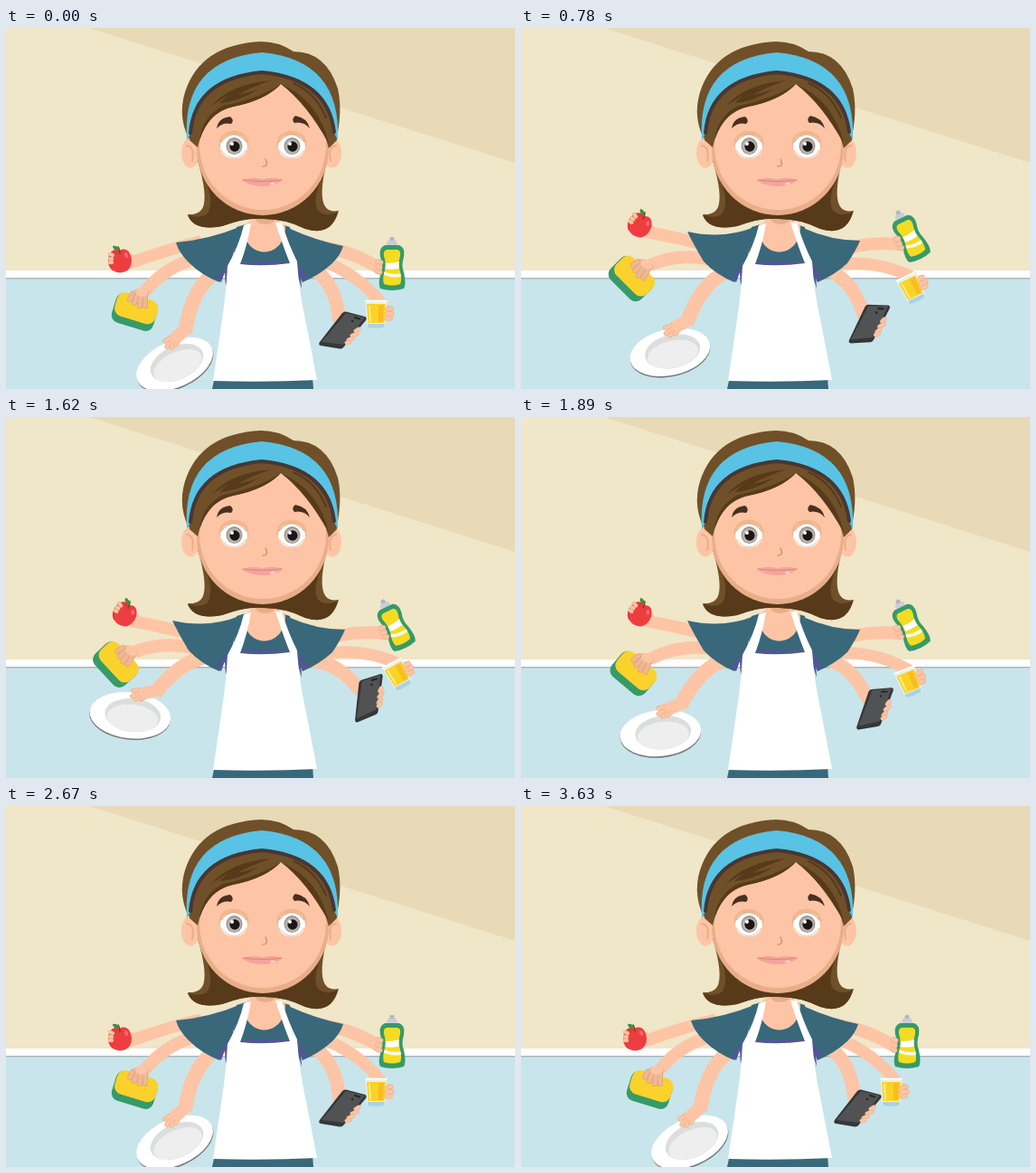
An HTML page with a canvas that plays this animation: 563 by 399 pixels, repeating every 3660 ms.

```html
<!DOCTYPE html>
<html lang="en">
<head>
<meta charset="utf-8">
<title>Busy hands</title>
<style>
html, body { margin: 0; width: 100%; height: 100%; overflow: hidden; background: #f0e6c7; }
canvas { display: block; }
</style>
</head>
<body>
<canvas id="stage" width="563" height="399"></canvas>
<script>
const ctx = document.getElementById('stage').getContext('2d');
const LOOP = 3660;
const SKIN = '#fdc5a5', SKIN_DARK = '#e9ae89', TEAL = '#38687a', PURPLE = '#515793';
const HAIR = '#6f5029', HAIR_DARK = '#573a1a', GREEN = '#369a69', YELLOW = '#fbd22c';

const fill = (d, color) => { ctx.fillStyle = color; ctx.fill(new Path2D(d)); };
function line(d, color, width, cap = 'round') {
  ctx.strokeStyle = color;
  ctx.lineWidth = width;
  ctx.lineCap = cap;
  ctx.lineJoin = 'round';
  ctx.stroke(new Path2D(d));
}
function oval(x, y, rx, ry, color, deg = 0) {
  ctx.fillStyle = color;
  ctx.beginPath();
  ctx.ellipse(x, y, rx, ry, deg * Math.PI / 180, 0, 7);
  ctx.fill();
}
function box(x, y, w, h, r, color) {
  ctx.fillStyle = color;
  ctx.beginPath();
  ctx.roundRect(x, y, w, h, r);
  ctx.fill();
}
function turned(x, y, deg, draw) {
  ctx.save();
  ctx.translate(x, y);
  ctx.rotate(deg * Math.PI / 180);
  ctx.translate(-x, -y);
  draw();
  ctx.restore();
}
function fingers(width, ...paths) {
  for (const d of paths) {
    line(d, SKIN_DARK, width);
    line(d, SKIN, width - 1.2);
  }
}

const ease = (t, from, to) => {
  const u = Math.min(1, Math.max(0, (t - from) / (to - from)));
  return u * u * (3 - 2 * u);
};
// Raised amount: rises during [a, b], falls during [c, d].
const lift = (t, a, b, c, d) => ease(t, a, b) - ease(t, c, d);

function background() {
  ctx.fillStyle = '#f0e6c8';
  ctx.fillRect(0, 0, 563, 399);
  fill('M92 0H563V149Z', '#e8dab7');
  ctx.fillStyle = '#fff';
  ctx.fillRect(0, 268, 563, 8);
  ctx.fillStyle = '#a9b6bd';
  ctx.fillRect(0, 276, 563, 1.7);
  ctx.fillStyle = '#c8e5eb';
  ctx.fillRect(0, 277.7, 563, 122);
}

function plateArm() {
  oval(187, 373, 45, 25.5, '#77797b', -24);
  oval(186.5, 371.5, 45, 25.5, '#fff', -24);
  oval(189, 370, 31, 18.5, '#dcdddd', -24);
  oval(190, 373, 28.5, 15, '#eeeeee', -24);
  line('M238 266Q205 284 198 337', SKIN, 16, 'butt');
  fill('M190 331L205 335Q197 346 188 349L179 341Z', SKIN);
  fingers(5.4, 'M186 340L176 346', 'M188 342L178 352', 'M190 343L183 353', 'M192 343L188 350');
  oval(189, 341, 7, 6, SKIN);
}

function spongeArm() {
  line('M220 252Q178 261 154 291', SKIN, 14, 'butt');
  turned(143, 312, 17, () => {
    box(119, 297, 48, 34, 9, GREEN);
    box(120, 296, 47, 27, 9, YELLOW);
  });
  oval(147, 295, 12, 7, '#f0b893', -20);
  for (const d of ['M140 294L137 300', 'M145 296L142 304', 'M149 297L148 307', 'M154 297L154 307']) {
    line(d, '#d99f78', 6);
    line(d, '#f0b893', 4.8);
  }
  oval(150, 292, 7, 5, SKIN);
}

function appleArm() {
  line('M216 236Q188 242 139 259', SKIN, 13.5, 'butt');
  oval(138, 258, 7, 8, SKIN);
  oval(121.5, 257, 8.5, 12, '#ea353a');
  oval(130, 257, 9, 12.5, '#ee3d40');
  oval(126, 260, 10, 10.5, '#ee3d40');
  line('M126 249Q126 245 124 242', '#70451f', 1.5);
  fill('M125 246Q118 246 118 241Q124 240 125 246Z', '#3b9242');
  oval(133, 251, 2, 3, '#f4686a', -25);
  fingers(4.4, 'M115 250L118 251', 'M115 255L117 255', 'M115 259L117 259');
}

function bottleArm() {
  line('M344 242Q378 244 414 266', SKIN, 14, 'butt');
  oval(413, 264, 6, 9, SKIN);
  box(424.5, 231, 5, 7, 1.5, '#aeb7c5');
  box(421.5, 235, 11, 6, 2, '#c7ced9');
  fill('M419 240H435Q442 243 440 253Q437 262 440 270Q443 283 440 288Q427 292 414 288Q411 282 415 270Q418 262 414 253Q412 243 419 240Z', GREEN);
  const label = new Path2D('M421 245H433Q437 246 436 252Q433 262 436 269Q438 279 436 283Q427 286 418 283Q416 277 419 268Q421 261 418 252Q417 246 421 245Z');
  ctx.save();
  ctx.clip(label);
  box(414, 242, 28, 46, 0, '#f3dc22');
  fill('M414 259Q426 262 441 256V264Q428 269 414 265Z', '#fff');
  fill('M414 267Q427 275 441 270V274Q427 278 414 271Z', '#fffbe8');
  ctx.restore();
  fingers(5, 'M411 258L415 259', 'M411 264L414 265', 'M411 269L414 270');
}

function glassArm() {
  line('M346 256Q390 271 417 307', SKIN, 13, 'butt');
  oval(423, 315, 6, 8.5, SKIN, -10);
  fill('M397.5 301H421.5L419.5 331Q409 333 399.5 331Z', '#e8f1ee');
  fill('M399 305H420L418.5 326H400.5Z', '#fbd326');
  fill('M412 306H418L417 325H412Z', '#f8bd20');
  line('M402 307L403 324', '#fff0a0', 1.5);
  fill('M400 327H419L418.5 331Q409 333 400 331Z', '#a9d3e4');
  line('M398 301.5H421', '#fff', 1.5);
  fingers(5, 'M422 311L426 310', 'M421 316L427 316', 'M421 321L425 321');
}

function phoneArm() {
  line('M336 264Q365 279 369 325', SKIN, 15, 'butt');
  oval(380, 337, 7, 9, SKIN, 25);
  fill('M376 313.5L397 319Q400 320 398 323L374 352Q372 355 369 354.5L348 351Q345 350 347 347L372 315Q374 313 376 313.5Z', '#353638');
  fill('M376 315L397 320L373 350L349 347Z', '#515254');
  line('M386 320L391 321.5', '#252628', 2.2);
  oval(383, 324, 1.3, 1.3, '#252628');
  fingers(5, 'M390 333L387 335', 'M388 338L383 340', 'M383 343L379 345', 'M380 347L377 348');
}

function torso(up) {
  fill('M255 220Q285 210 314 220L322 300H246Z', TEAL);
  fill('M231 385H339L340 399H228Z', TEAL);
  const ly = 237 - 12 * up, ry = 241 - 6 * up;
  fill(`M258 220Q224 234 ${188 - 4 * up} ${ly}Q${191 - 2 * up} ${ly + 11} 202 ${259 - up}Q216 273 236 281L250 255Z`, TEAL);
  fill(`M312 221Q343 235 ${373 + 2 * up} ${ry}Q${370 + up} ${ry + 10} 361 260Q347 273 328 281L317 255Z`, TEAL);
  fill('M247 258L232 277L238 281L242 270L243 285L249 262Z', PURPLE);
  fill('M321 258L334 275L328 281L326 272L327 288L319 262Z', PURPLE);
  fill('M263 219C262 257 309 257 309 219L297 210H274Z', SKIN);
  fill('M275 209H299Q297 217 286 217Q276 216 275 209Z', SKIN_DARK);
  fill('M253 258H319V263H253Z', PURPLE);
  fill('M263 218L271 216Q267 240 259 261Q285 264 314 260Q306 240 298 215L305 215Q312 238 322 258Q324 290 331 322Q337 352 344 389Q286 392 229 390Q235 350 241 308Q244 285 245 263Q258 240 263 218Z', '#fff');
}

function eye(x) {
  oval(x, 127.5, 16.5, 14, '#f0b78f');
  oval(x, 131, 15, 13.5, '#fff');
  line(`M${x - 14} 126Q${x} 109 ${x + 14} 126`, '#d99d72', 1);
  line(`M${x - 14} 135Q${x} 153 ${x + 14} 135`, '#e2c2ae', 1);
  oval(x + 0.5, 130.5, 9, 9.5, '#9d9690');
  oval(x + 0.5, 131, 7.6, 8, '#bdb7b1');
  oval(x + 1, 131, 5.6, 5.8, '#1b1716');
  oval(x - 2, 128, 2, 2, '#fff');
}

function head() {
  // Back hair with flicked ends
  fill('M210 140Q222 178 219 194Q217 207 201 206Q208 225 239 219Q265 209 285 211Q309 211 331 222Q360 231 368 202Q352 205 350 188Q348 172 357 140Z', HAIR);
  fill('M216 160Q233 190 222 206Q214 211 201 207Q208 225 239 219Q265 209 285 211Q309 211 331 222Q360 231 367 203Q355 210 345 202Q338 190 350 165Z', HAIR_DARK);
  fill('M282 15Q302 15 318 26Q354 26 367 67Q373 94 364 128H205Q189 100 198 71Q215 18 282 15Z', HAIR);
  for (const [x, side] of [[204, 1], [361, -1]]) {
    oval(x, 138, 10, 16.5, SKIN);
    line(`M${x - 4 * side} 130Q${x + 5 * side} 131 ${x + 2 * side} 147`, SKIN_DARK, 2);
  }
  // Face and its shaded rim
  oval(284, 133, 73, 74, SKIN_DARK);
  oval(284, 130, 70, 71, SKIN);
  // Fringe, parted right of the centre
  fill('M203 124Q200 58 283 47Q361 55 366 124L357 133Q346 87 304 62Q287 80 251 87Q220 94 212 132Z', HAIR);
  fill('M304 62Q287 80 251 87Q225 92 214 124Q217 98 240 86Q280 78 304 62Z', HAIR_DARK);
  fill('M227 86Q248 62 293 58Q270 66 256 74Q268 72 280 67Q257 82 236 83L246 74Z', HAIR_DARK);
  fill('M304 62Q346 80 357 128Q333 84 304 62Z', HAIR_DARK);
  line('M318 61Q343 72 354 99', HAIR_DARK, 2);
  // Headband
  fill('M200 124Q194 35 283 27Q371 35 367 124L363 116Q359 54 283 48Q206 54 203 119Z', '#58c3e4');
  line('M204 116Q209 56 283 49Q356 56 363 115', '#483634', 4);

  fill('M233 111Q235 99 248 98Q253 102 249 106Q240 104 233 111Z', '#493020');
  fill('M336 111Q333 99 320 97Q315 101 319 105Q329 103 336 111Z', '#493020');
  eye(252);
  eye(316);
  line('M287 145Q291 153 284 153', '#d79471', 1.5);
  fill('M261 168Q272 165 278 166Q284 168 289 166Q297 165 306 168Q299 175 284 175Q269 175 261 168Z', '#f4a59b');
  line('M262 168Q283 171 305 168', '#d98479', 1);
  oval(295, 172, 3, 1.2, '#fbd4cd', -8);
}

function draw(t) {
  const top = lift(t, 90, 650, 2030, 2640);
  const mid = lift(t, 300, 880, 1700, 2320);
  const low = lift(t, 530, 1120, 1640, 2220);
  background();
  turned(240, 259, 30 * low, plateArm);
  turned(344.6, 272.5, -32 * low, phoneArm);
  turned(207, 254, 30 * mid, spongeArm);
  turned(359, 253, -28 * mid, glassArm);
  turned(202, 247, 30 * top, appleArm);
  turned(359, 240, -26 * top, bottleArm);
  torso(top);
  head();
}

function tick() {
  draw(performance.now() % LOOP);
  requestAnimationFrame(tick);
}
tick();
</script>
</body>
</html>
```
